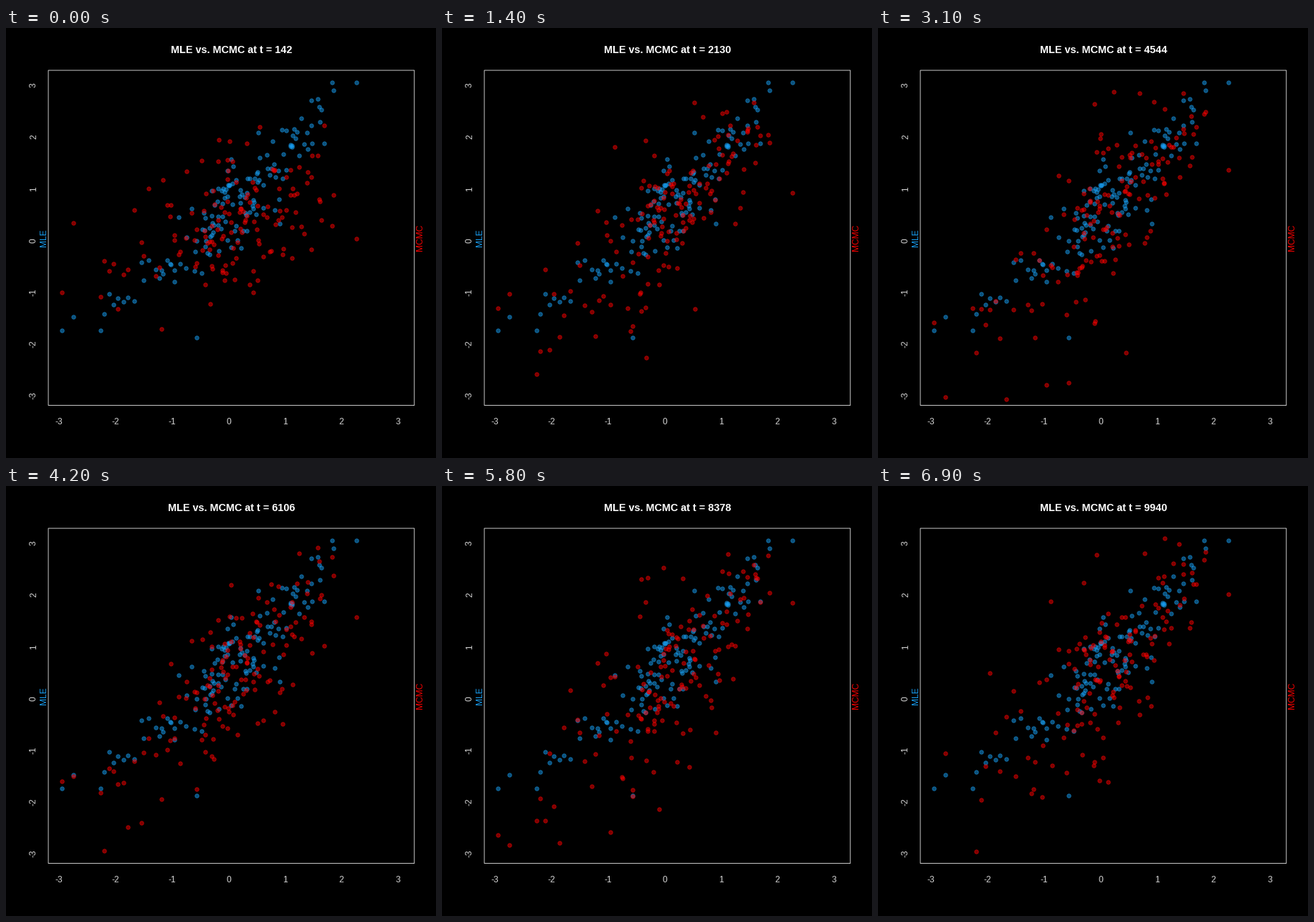
These frames come from a looping animation (600 by 600 pixels, 7 s). A matplotlib script:

```python
import numpy as np
import matplotlib.pyplot as plt
from matplotlib.animation import FuncAnimation
from matplotlib.patches import Rectangle

plt.rcParams["font.family"] = "Liberation Sans"

SIZE, DPI = 600, 100
FRAMES, STEP_MS, STEP_T = 70, 100, 142
COUNT = 146
PT = 72 / DPI                            # points per pixel
LEFT, TOP, WIDTH, HEIGHT = 59.04, 59.04, 510.72, 467.52
LOW, HIGH = -3.19, 3.29                  # both axes share one range
BLUE, RED, GREY = "#18a0f5", "#ff0000", "#d3d3d3"

# The isolated estimates at both ends and the lowest one.
EXTREMES = np.array([(-2.95, -1.74), (-2.75, -1.48), (-2.26, -1.74),
                     (-0.57, -1.88), (1.84, 3.05), (1.86, 2.90),
                     (2.27, 3.05)])


def px(x):
    return LEFT + WIDTH * (x - LOW) / (HIGH - LOW)


def py(y):
    return TOP + HEIGHT * (HIGH - y) / (HIGH - LOW)


def estimates(rng):
    """A rising cloud: x by its quantiles, y scattered around a gentle curve."""
    n = COUNT - len(EXTREMES)
    p = (np.arange(n) + 0.5) / n
    x = np.interp(p, [0, 0.08, 0.2, 0.5, 0.7, 0.9, 0.98, 1],
                  [-2.25, -1.25, -0.45, 0.1, 0.54, 1.23, 1.6, 1.72])
    x += rng.normal(0, 0.03, n)
    spread = 0.48 * np.exp(-x**2 / 4)
    y = 0.63 + x + 0.06 * x**2 + spread * rng.normal(size=n)
    return np.vstack([np.column_stack([x, y]), EXTREMES]).T


def chains(rng, x, est):
    """One row per step: autocorrelated noise around a settling mean."""
    start = 0.3 + 0.4 * x
    settled = 0.5 * est + 0.5 * (0.4 + x) - 0.1
    sd = np.interp(x, [-3, -0.5, 0.5, 1.5, 2], [0.7, 0.9, 0.75, 0.55, 0.4])
    rho = 0.5
    noise = rng.normal(size=COUNT)
    rows = []
    for k in range(FRAMES):
        w = np.exp(-k / 5)
        rows.append(w * start + (1 - w) * settled + sd * noise)
        noise = rho * noise + np.sqrt(1 - rho**2) * rng.normal(size=COUNT)
    rows = np.array(rows)
    # The rightmost chain only creeps towards its estimate.
    rows[:, -1] = 0.03 + 1.98 * np.sqrt(np.linspace(0, 1, FRAMES))
    return rows


rng = np.random.default_rng(7)
x, mle = estimates(rng)
mcmc = chains(rng, x, mle)

fig = plt.figure(figsize=(SIZE / DPI, SIZE / DPI), dpi=DPI, facecolor="black")
ax = fig.add_axes([0, 0, 1, 1])
ax.set_xlim(0, SIZE)
ax.set_ylim(SIZE, 0)
ax.axis("off")

frame = Rectangle((LEFT, TOP), WIDTH, HEIGHT, fill=False, ec="#dcdcdc",
                  lw=0.9 * PT, snap=False, zorder=4)
ax.add_patch(frame)


def label(x, y, s, color, size=12, **kw):
    return ax.text(x, y, s, color=color, fontsize=size * PT, ha="center",
                   va="baseline", rotation_mode="anchor", **kw)


def dots(y, color, zorder):
    d = ax.scatter(px(x), py(y), s=(5.5 * PT) ** 2, color=color, alpha=0.5,
                   linewidths=PT, snap=False, zorder=zorder)
    d.set_clip_path(frame)
    return d


for v in range(-3, 4):
    label(px(v), 553, str(v), GREY)
    label(42, py(v), str(v), GREY, rotation=90)
middle = TOP + HEIGHT / 2
label(56.4, middle, "MLE", BLUE, rotation=90)
label(581.4, middle, "MCMC", RED, rotation=90)
title = label(LEFT + WIDTH / 2, 35, "", "white", size=14.4, weight="bold")

dots(mle, BLUE, 2)
samples = dots(mcmc[0], RED, 3)


def draw(k):
    samples.set_offsets(np.column_stack([px(x), py(mcmc[k])]))
    title.set_text(f"MLE vs. MCMC at t = {STEP_T * (k + 1)}")
    return samples, title


anim = FuncAnimation(fig, draw, frames=FRAMES, interval=STEP_MS,
                     repeat=True, repeat_delay=0)
plt.show()
```
